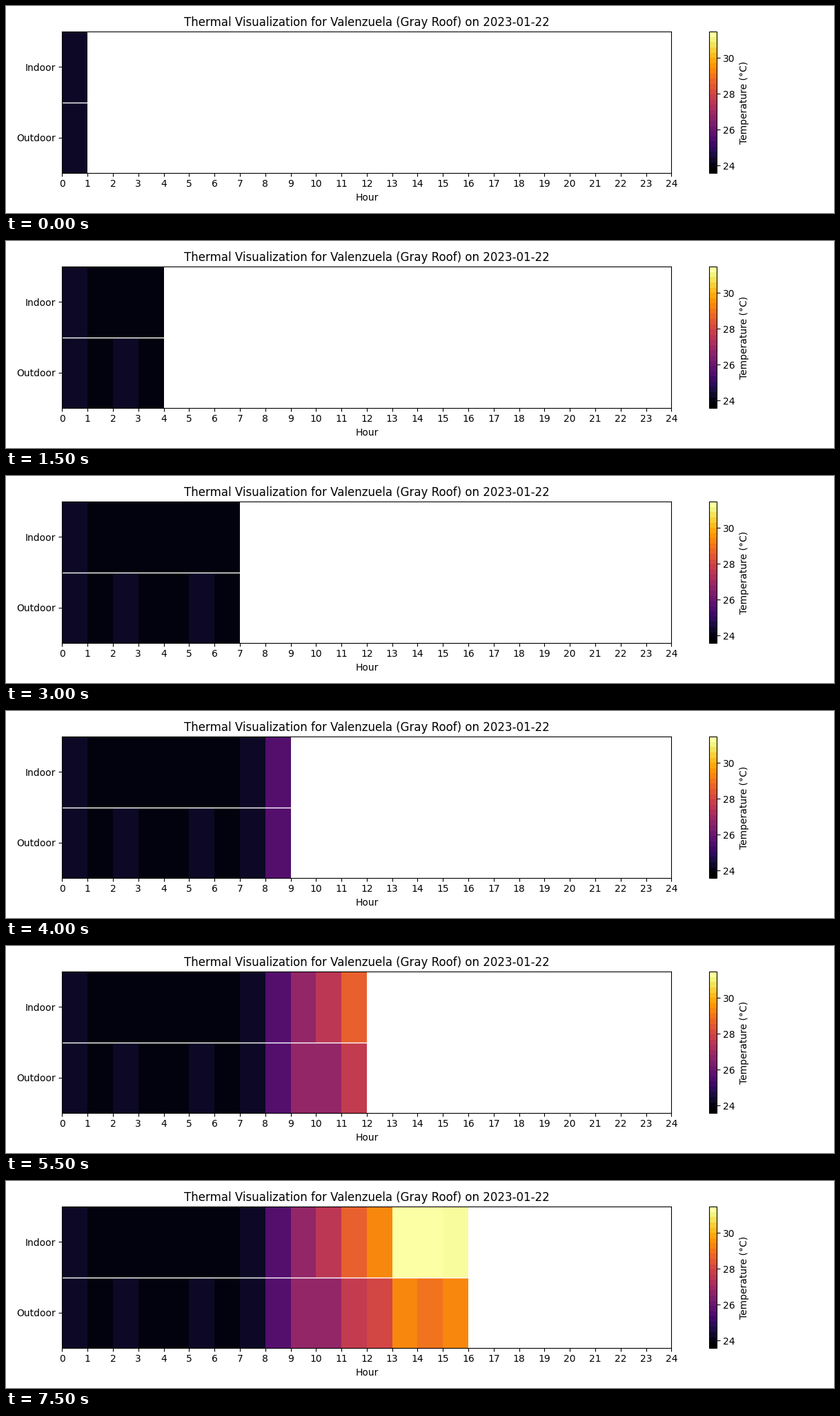
Recreate the animation shown at these times as a matplotlib script. Size 1200 px wide and 300 px high, loop 8 s.

```python
import matplotlib.pyplot as plt
import numpy as np
from matplotlib.animation import FuncAnimation
from matplotlib.cm import ScalarMappable
from matplotlib.colors import Normalize

W, H, DPI = 1200, 300, 100
STEPS, STEP_MS = 16, 500
T_MIN, T_MAX = 23.6, 31.46

plt.rcParams["font.family"] = "DejaVu Sans"

# Hourly readings as a share of the temperature range
COOL, MILD = 0.026, 0.068
INDOOR = [MILD] + [COOL] * 6 + [MILD, 0.245, 0.4, 0.5, 0.642, 0.738, 1, 1, 0.99]
OUTDOOR = [MILD, COOL, MILD, COOL, COOL, MILD, COOL, MILD,
           0.245, 0.4, 0.4, 0.523, 0.565, 0.738, 0.69, 0.738]

temps = np.full((2, 24), np.nan)
temps[:, :STEPS] = T_MIN + np.array([INDOOR, OUTDOOR]) * (T_MAX - T_MIN)

fig = plt.figure(figsize=(W / DPI, H / DPI), dpi=DPI, facecolor="white")


def add_axes(left, right, bottom=58.28, top=262.67):
    """Place axes by pixel edges, measured from the lower left corner."""
    return fig.add_axes([left / W, bottom / H, (right - left) / W, (top - bottom) / H])


def visible(step):
    shown = np.arange(24) <= step
    return np.ma.masked_invalid(np.where(shown, temps, np.nan))


ax = add_axes(81.45, 964.29)
norm = Normalize(T_MIN, T_MAX)
cmap = plt.get_cmap("inferno")
mesh = ax.pcolormesh(np.arange(25), np.arange(3), visible(0), cmap=cmap, norm=norm)
ax.axhline(1, color="white", lw=1)
ax.set_xlim(0, 24)
ax.set_ylim(2, 0)
ax.set_title("Thermal Visualization for Valenzuela (Gray Roof) on 2023-01-22")
ax.set_xlabel("Hour")
ax.set_xticks(range(25))
ax.set_yticks([0.5, 1.5], ["Indoor", "Outdoor"])

bar = fig.colorbar(ScalarMappable(norm, cmap.resampled(27)), cax=add_axes(1019.47, 1029.69))
bar.set_ticks([24, 26, 28, 30])
bar.set_label("Temperature (°C)")


def draw(step):
    mesh.set_array(visible(step))
    return (mesh,)


anim = FuncAnimation(fig, draw, frames=STEPS, interval=STEP_MS,
                     init_func=lambda: draw(0), repeat=True, repeat_delay=0)
plt.show()
```
